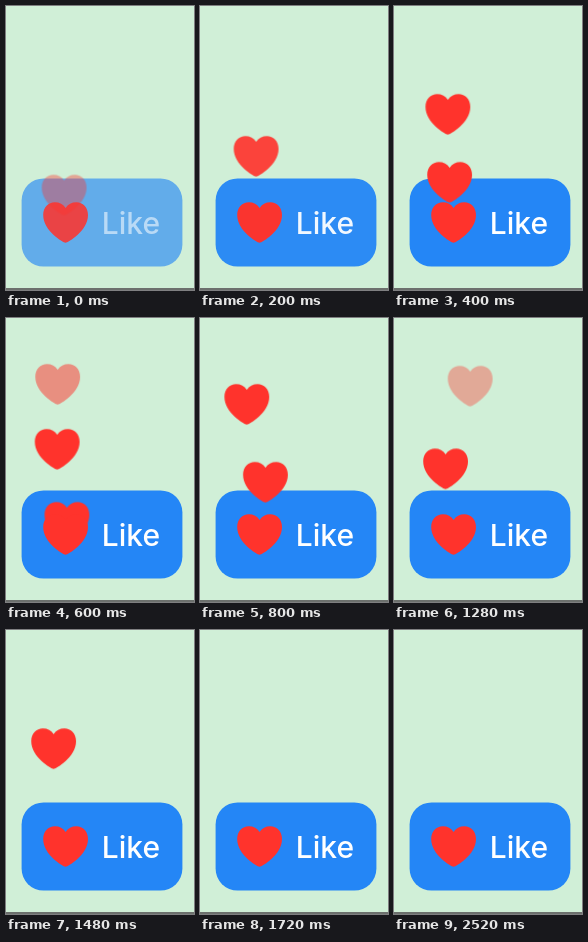
An HTML page that plays this animation: 188x284 px, repeating every 2.56 s.

```html
<!DOCTYPE html>
<html lang="en">
<head>
<meta charset="utf-8">
<title>Like button</title>
<style>
html, body { margin: 0; width: 100%; height: 100%; overflow: hidden; background: #d0efd7; }
svg { display: block; width: 100%; height: 100%; }
text { font: 500 30px Inter, Roboto, sans-serif; fill: #fff; }
.heart { fill: #ff332c; }

/* every part runs on the same loop; --at is the launch time */
.fly { opacity: 0; animation: fly 2560ms linear calc(var(--at) - 2560ms) infinite; }
.first { animation: appear 2560ms linear infinite; }
.dim { animation: dim 2560ms linear infinite; }

@keyframes fly {
  0% { transform: translate(0, 0); opacity: 1; }
  24.2% { opacity: 1; }
  31.8% { transform: translate(var(--x), var(--y)); opacity: 0; }
  100% { transform: translate(var(--x), var(--y)); opacity: 0; }
}
@keyframes appear {
  0% { opacity: .34; }
  9%, 90% { opacity: 1; }
  90.01%, 100% { opacity: 0; }
}
@keyframes dim {
  0% { opacity: var(--low); }
  9%, 100% { opacity: 1; }
}
</style>
</head>
<body>
<svg viewBox="0 0 188 284" preserveAspectRatio="none">
  <defs>
    <path id="heart" transform="translate(59.6 216.3)" d="M0 20.5C-2.5 20.5-22.4 8.5-22.4-7.2C-22.4-15-17.2-20-10.8-20C-6.2-20-2.2-18 0-14.4C2.2-18 6.2-20 10.8-20C17.2-20 22.4-15 22.4-7.2C22.4 8.5 2.5 20.5 0 20.5Z"/>
  </defs>
  <rect width="188" height="284" fill="#d0efd7"/>
  <rect y="282" width="188" height="2" fill="#6c706d"/>
  <rect class="dim" style="--low:.61" x="15.6" y="172.4" width="160.8" height="88.2" rx="22" fill="#2486f6"/>
  <text class="dim" style="--low:.52" x="95.8" y="228">Like</text>
  <g class="heart">
    <g class="first"><use class="fly" href="#heart" style="--at:-114ms;--x:-9px;--y:-171px"/></g>
    <use class="fly" href="#heart" style="--at:222ms;--x:-18px;--y:-183px"/>
    <use class="fly" href="#heart" style="--at:540ms;--x:18.2px;--y:-163px"/>
    <use class="fly" href="#heart" style="--at:873ms;--x:-16px;--y:-131px"/>
    <use class="dim" href="#heart" style="--low:.86"/>
  </g>
</svg>
</body>
</html>
```
